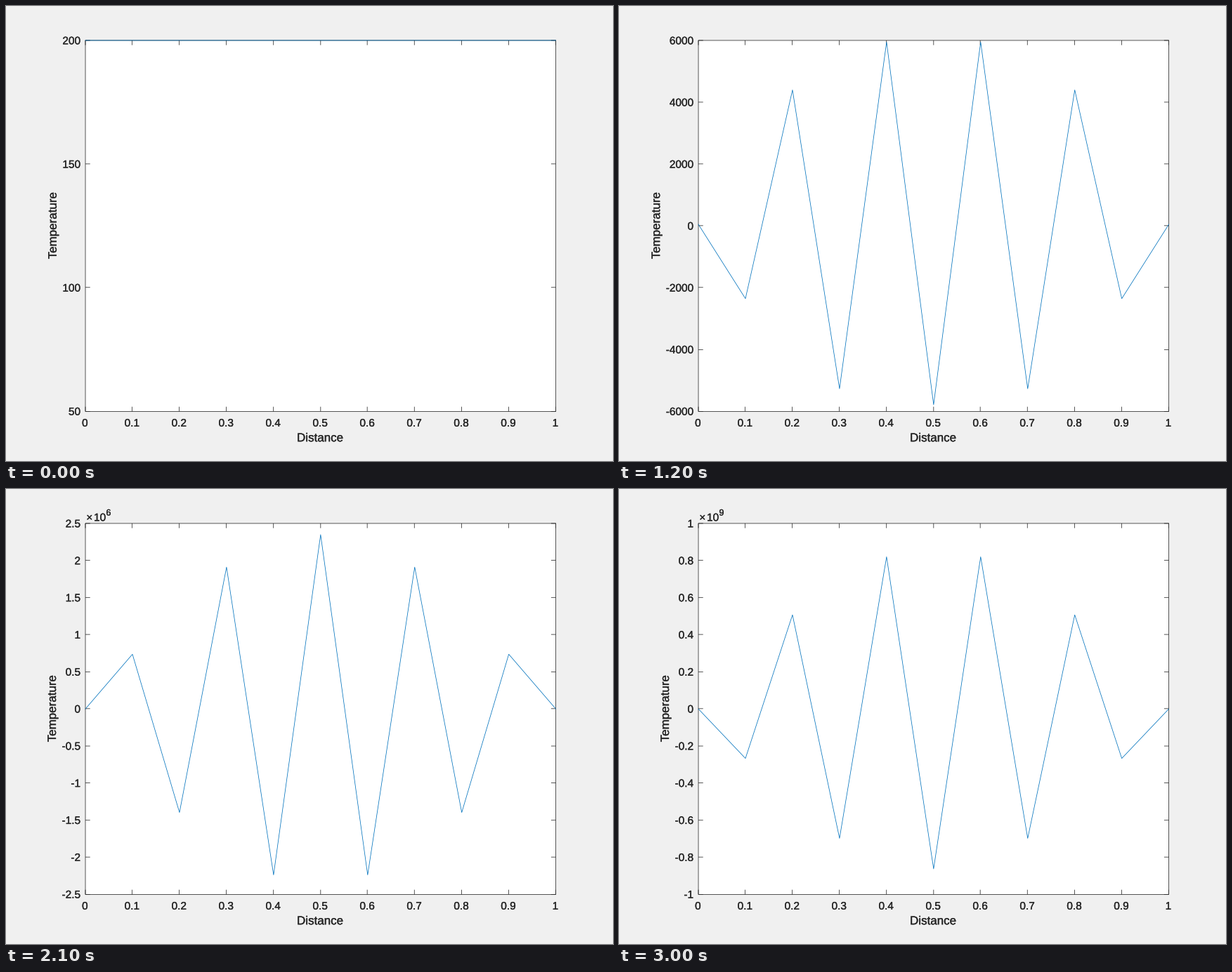
Recreate the animation shown at these times as a matplotlib script. Size 864 by 648 pixels, loop 3.1 s.

```python
import math

import matplotlib
import matplotlib.pyplot as plt
import numpy as np
from matplotlib.animation import FuncAnimation
from matplotlib.collections import LineCollection
from matplotlib.patches import Rectangle
from matplotlib.patheffects import withStroke

matplotlib.rcParams["text.hinting"] = "none"
matplotlib.rcParams["font.family"] = "Liberation Sans"
matplotlib.rcParams["path.snap"] = False

W, H = 864, 648
FRAMES, INTERVAL = 31, 100
INK, BLUE, BACK = "#262626", "#0072bd", "#f0f0f0"
TICK_SIZE, LABEL_SIZE, LINE, TICK = 15.43, 16.97, 0.77, 6.7
HOT, COLD, RATIO = 200.0, 50.0, 0.75
MAX_TICKS = 11
LEFT, RIGHT, TOP, BOTTOM = 0.13 * W, 0.905 * W, 0.075 * H, 0.89 * H
CELL = W / 1120

x = np.linspace(0, 1, 11)


def grid(v):
    """Centre of the fine grid cell nearest to v; thin lines sit on it."""
    return (np.round(np.asarray(v) / CELL) + 0.5) * CELL


def simulate():
    """Explicit heat equation with an unstable ratio; the ends go cold at once."""
    temp = np.full(x.size, HOT)
    states = [temp]
    for _ in range(FRAMES - 1):
        new = temp.copy()
        new[1:-1] += RATIO * (temp[:-2] - 2 * temp[1:-1] + temp[2:])
        new[[0, -1]] = COLD
        states.append(new)
        temp = new
    return states


def axis_range(lo, hi):
    """Tightest limits on a 1-2-5 step; the finer step wins a tie."""
    power = math.floor(math.log10(hi - lo))
    best = None
    for p in (power - 1, power):
        for m in (1, 2, 5):
            step = m * 10.0 ** p
            a, b = math.floor(lo / step), math.ceil(hi / step)
            if not 3 <= b - a <= MAX_TICKS - 1:
                continue
            span = (b - a) * step
            if best is None or span < best[0] * (1 - 1e-9):
                best = (span, step, a, b)
    _, step, a, b = best
    return step * np.arange(a, b + 1)


def text_width(s):
    em = {".": 0.278, "-": 0.333}
    return TICK_SIZE * sum(em.get(c, 0.556) for c in s)


fig = plt.figure(figsize=(W / 72, H / 72), dpi=72, facecolor=BACK)
ax = fig.add_axes([0, 0, 1, 1])
ax.set(xlim=(0, W), ylim=(H, 0))
ax.axis("off")

x0, x1, y0, y1 = grid([LEFT, RIGHT, TOP, BOTTOM])
ax.add_patch(Rectangle((x0, y0), x1 - x0, y1 - y0, facecolor="white",
                       edgecolor=INK, lw=LINE, zorder=1))


def tick_marks():
    return ax.add_collection(LineCollection([], colors=INK, linewidths=LINE,
                                            zorder=2))


def put(px, py, s, size=TICK_SIZE, ha="center", **kw):
    return ax.text(px, py, s, fontsize=size, color=INK, ha=ha, va="baseline",
                   path_effects=[withStroke(linewidth=0.3, foreground=INK)],
                   **kw)


x_marks, y_marks = tick_marks(), tick_marks()
tick_x = LEFT + x * (RIGHT - LEFT)
x_marks.set_segments([[(px, edge), (px, edge + d)] for px in grid(tick_x)
                      for edge, d in ((y0, TICK), (y1, -TICK))])
for v, px in zip(x, tick_x):
    put(px, 598.8, f"{v:.3g}")
put((LEFT + RIGHT) / 2, 620.2, "Distance", LABEL_SIZE)
ylabel = put(0, (TOP + BOTTOM) / 2, "Temperature", LABEL_SIZE,
             rotation=90, rotation_mode="anchor")
y_names = [put(106, 0, "", ha="right") for _ in range(MAX_TICKS)]
scale = [put(114.3, 45.5, "×", ha="left"), put(125, 45.5, "10", ha="left")]
exponent = put(142.4, 37.7, "", 12.6, ha="left")
line, = ax.plot([], [], color=BLUE, lw=LINE, zorder=3,
                solid_joinstyle="round")

states = simulate()


def draw(i):
    temp = states[i]
    ticks = axis_range(min(temp.min(), COLD), temp.max())
    part = (temp - ticks[0]) / (ticks[-1] - ticks[0])
    line.set_data(x0 + x * (x1 - x0), y1 - part * (y1 - y0))

    tick_y = np.linspace(BOTTOM, TOP, len(ticks))
    y_marks.set_segments([[(edge, py), (edge + d, py)] for py in grid(tick_y)
                          for edge, d in ((x0, TICK), (x1, -TICK))])

    power = math.floor(math.log10(np.abs(ticks).max()) + 1e-9)
    scaled = power >= 4
    unit = 10.0 ** power if scaled else 1
    names = [f"{t / unit:.6g}" for t in ticks]
    for part_text in scale:
        part_text.set_visible(scaled)
    exponent.set_text(str(power) if scaled else "")

    for label in y_names:
        label.set_text("")
    for label, name, py in zip(y_names, names, tick_y):
        label.set_text(name)
        label.set_y(py + 5.9)
    ylabel.set_x(106 - max(map(text_width, names)) - 8.4)
    return [line]


anim = FuncAnimation(fig, draw, frames=FRAMES, interval=INTERVAL,
                     repeat=True, repeat_delay=0, blit=False)
plt.show()
```
